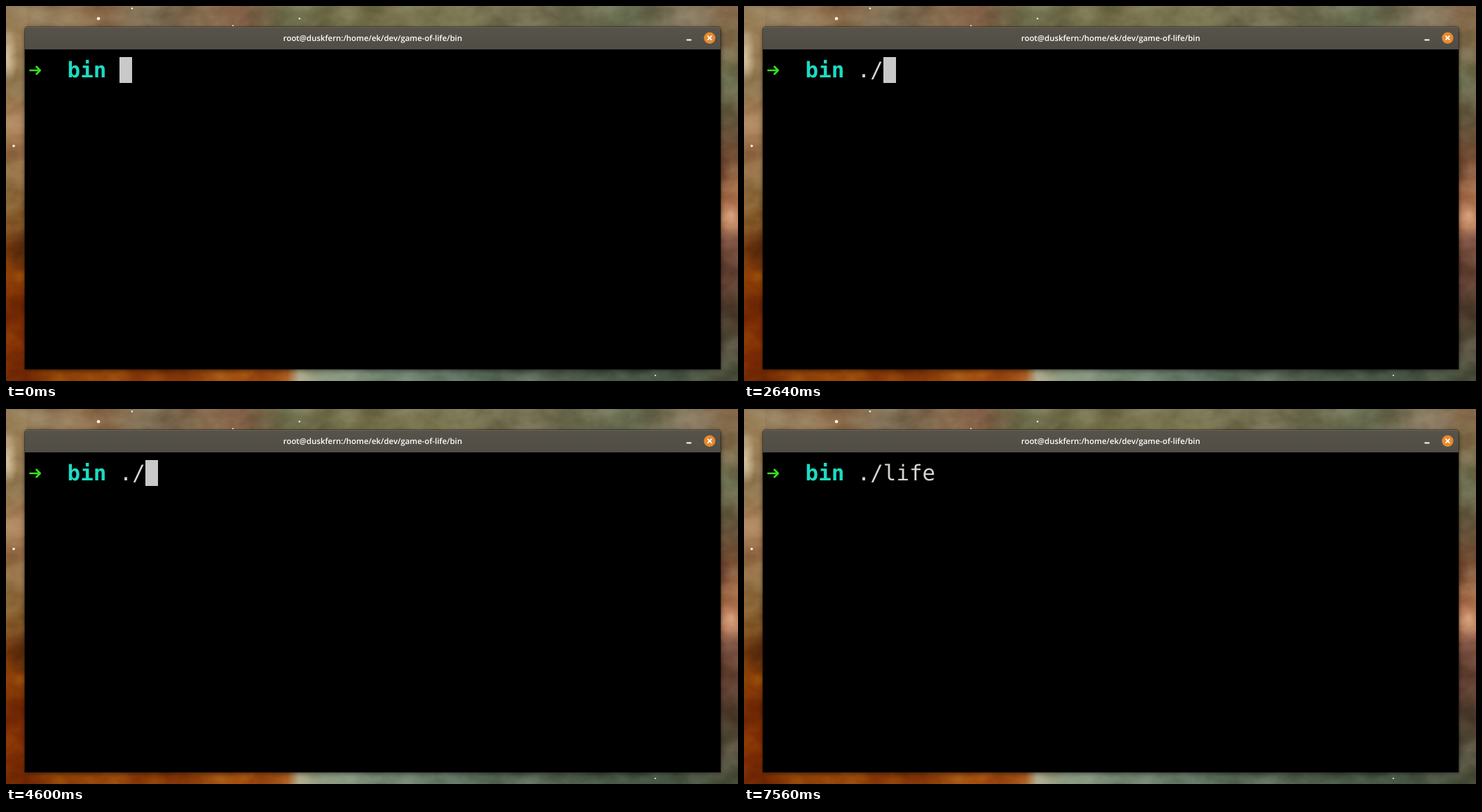
Recreate the animation shown at these times as an HTML page. Size 1045x536 px, loop 8000 ms.

```html
<!DOCTYPE html>
<html lang="en">
<head>
<meta charset="utf-8">
<title>Terminal</title>
<style>
  html, body { margin: 0; width: 100%; height: 100%; overflow: hidden; background: #000; }
  .stage { position: relative; width: 1045px; height: 536px; overflow: hidden; text-rendering: geometricPrecision; }
  .stage * { box-sizing: border-box; }
  .strip, .sky, .window { position: absolute; }
  .sky { inset: 0; width: 1045px; height: 536px; }

  /* Wallpaper: only the four edges around the window are visible. */
  .top {
    left: 0; top: 0; width: 1045px; height: 40px;
    background: linear-gradient(90deg, #8f7852, #8b7350 60px, #8f6f4c 130px, #81735a 210px, #866a4c 290px,
      #86644a 335px, #757452 400px, #75704a 520px, #807b57 640px, #757053 770px, #6b7053 890px, #7c6e54 970px, #8a6f50);
  }
  .bottom {
    left: 0; bottom: 0; width: 1045px; height: 24px;
    background: linear-gradient(90deg, #7a2e04, #873806 70px, #97460a 170px, #8b3d0a 260px, #a55010 340px, #a05218 402px,
      #a5a080 418px, #8e9c84 460px, #748672 540px, #647766 640px, #586553 780px, #485746 920px, #4b503c);
  }
  .left {
    left: 0; top: 0; width: 30px; height: 536px;
    background:
      radial-gradient(ellipse 15px 44px at 2px 72px, #e6d7b2cc, #e6d7b200),
      radial-gradient(ellipse 22px 36px at 20px 348px, #431c08cc, #431c0800),
      linear-gradient(#8f7852, #9c7f56 45px, #8e754e 115px, #a87f56 160px, #a07850 205px, #8f6d40 260px,
        #855a28 305px, #74390f 340px, #924408 385px, #7a2e04 430px, #822f04 480px, #7a2e04);
  }
  .right {
    right: 0; top: 0; width: 30px; height: 536px;
    background:
      radial-gradient(ellipse 20px 26px at 20px 298px, #efbd98aa, #efbd9800),
      radial-gradient(ellipse 14px 26px at 8px 232px, #573020aa, #57302000),
      linear-gradient(#8a6f50, #7c6947 55px, #606344 105px, #685a40 165px, #784f34 220px, #aa7450 270px,
        #b47b58 315px, #7a4f3e 335px, #644536 400px, #524634 460px, #4b503c);
  }

  .window {
    left: 27px; top: 30px; width: 993px; height: 489px; background: #000;
    border-radius: 4px 4px 0 0; box-shadow: 0 0 0 1px #0006, 0 2px 7px #0008;
  }
  .bar {
    position: absolute; inset: 0 0 auto; height: 32px; border-radius: inherit;
    background: linear-gradient(#57534a, #504d46); box-shadow: inset 0 1px #6c675c;
    color: #fff; font: 600 11.4px/33px "Open Sans", "Noto Sans", sans-serif; text-align: center;
  }
  .buttons { position: absolute; right: 0; top: 0; }

  .line {
    position: absolute; left: 5px; top: 43px; height: 37px; display: flex;
    font: 30.8px/39px "DejaVu Sans Mono", monospace; white-space: pre; color: #d3d7cf;
  }
  .arrow { width: 3ch; height: 37px; flex: none; }
  .dir { color: #1cdcc3; font-weight: bold; }
  .command { width: 0; overflow: hidden; animation: type 8s step-end infinite; }
  .cursor { width: 1ch; height: 36.5px; background: #c9c9c9; animation: blink 8s step-end infinite; }

  @keyframes type {
    0% { width: 0; }
    14% { width: 1ch; }
    33% { width: 2ch; }
    64.75% { width: 3ch; }
    70.25% { width: 4ch; }
    80.5%, 100% { width: 7ch; }
  }
  @keyframes blink {
    0%, 3.75%, 57.5% { opacity: 1; }
    1.5%, 54.5%, 94.5%, 100% { opacity: 0; }
  }
</style>
</head>
<body>
<div class="stage">
  <div class="strip top"></div>
  <div class="strip bottom"></div>
  <div class="strip left"></div>
  <div class="strip right"></div>
  <svg class="sky" viewBox="0 0 1045 536">
    <filter id="clouds" x="0" y="0" width="100%" height="100%" color-interpolation-filters="sRGB">
      <feTurbulence type="fractalNoise" baseFrequency=".018 .026" numOctaves="4" seed="8"/>
      <feColorMatrix values="1.4 0 0 0 -.2  1.4 0 0 0 -.2  1.4 0 0 0 -.2  0 0 0 0 1"/>
    </filter>
    <rect width="1045" height="536" filter="url(#clouds)" opacity=".4" style="mix-blend-mode:soft-light"/>
    <g fill="#fff4e8">
      <circle cx="132" cy="18" r="2.3"/>
      <circle cx="180" cy="3.5" r="1.3"/>
      <circle cx="419" cy="18" r="1.3"/>
      <circle cx="324" cy="28" r="1.1"/>
      <circle cx="11" cy="200" r="1.8"/>
      <circle cx="927" cy="528" r="1"/>
    </g>
  </svg>

  <div class="window">
    <div class="bar">root@duskfern:/home/ek/dev/game-of-life/bin
      <svg class="buttons" width="60" height="32" fill="none" stroke="#fff">
        <path d="M11.5 18.5h7" stroke-width="2"/>
        <circle cx="44.5" cy="15.7" r="8.2" fill="#e8892f" stroke="none"/>
        <path d="M41.5 12.7l6 6m0-6l-6 6" stroke-width="1.8"/>
      </svg>
    </div>
    <div class="line">
      <svg class="arrow" fill="none" stroke="#35e01c" stroke-width="2.7" stroke-linecap="round" stroke-linejoin="round">
        <path d="M2.5 19H16M11.5 13.8L16.7 19L11.5 24.2"/>
      </svg>
      <span class="dir">bin </span>
      <span class="command">./life </span>
      <span class="cursor"></span>
    </div>
  </div>
</div>
</body>
</html>
```
